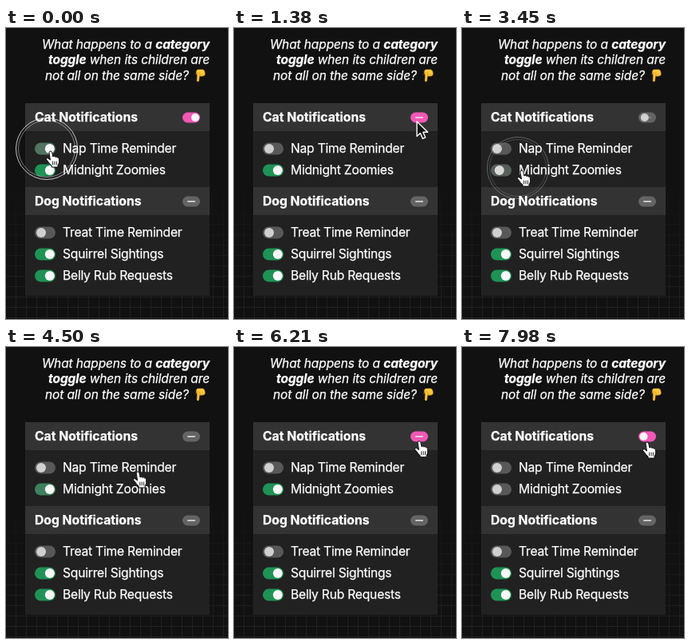
Animation of 278 by 364 pixels, one loop 8000 ms. Source, as an HTML page:

```html
<!DOCTYPE html>
<html lang="en">
<head>
<meta charset="utf-8">
<title>Category toggles</title>
<style>
  html, body { margin: 0; width: 100%; height: 100%; overflow: hidden; background: #111; }
  svg { display: block; width: 278px; height: 364px; }
  text { font: 15.6px Inter, "Open Sans", sans-serif; letter-spacing: -.2px; fill: #fff; stroke: #fff; stroke-width: .25px; }
  .head { font-size: 15.7px; font-weight: 700; letter-spacing: 0; }
  .title { font-size: 15.45px; font-style: italic; letter-spacing: -.08px; }
  .title tspan { font-weight: 700; }
</style>
</head>
<body>
<svg viewBox="0 0 278 364">
  <defs>
    <pattern id="grid" width="13" height="13" x="-1" y="-2" patternUnits="userSpaceOnUse">
      <path d="M.5 0V13M0 .5H13" stroke="#262626" fill="none"/>
    </pattern>
    <linearGradient id="fade" x2="0" y2="1">
      <stop stop-color="#fff" stop-opacity="0"/>
      <stop offset="1" stop-color="#fff" stop-opacity=".8"/>
    </linearGradient>
    <mask id="fadeMask"><rect y="185" width="278" height="179" fill="url(#fade)"/></mask>
  </defs>

  <rect width="278" height="364" fill="#111"/>
  <rect width="278" height="364" fill="url(#grid)" mask="url(#fadeMask)"/>

  <text class="title" x="255" y="26" text-anchor="end">What happens to a <tspan>category</tspan></text>
  <text class="title" x="255" y="45" text-anchor="end"><tspan>toggle</tspan> when its children are</text>
  <text class="title" x="49" y="64.5">not all on the same side?</text>

  <!-- pointing-down hand -->
  <g stroke="#d18b16" stroke-width=".5" fill="#fcc93c">
    <path d="M240 52h6.5q2.6 1 2.6 4v2.4q-.8 1.8-3 1.8h-5q-3-1.6-3-4.4 0-3 1.9-3.8z"/>
    <path d="M239.6 56h3.2l-1.2 10.2q-1.4 1.8-2.6 0z"/>
    <path d="M243.2 57v3M246 56.8v3M236.8 58.6q1.2-2 3-2.6" fill="none"/>
  </g>

  <rect x="24" y="94" width="231" height="241" fill="#212121"/>
  <path d="M24 94h231v35H24zM24 199h231v35H24z" fill="#333"/>

  <g id="rows"></g>
  <g id="controls"></g>

  <g id="ripple" stroke="#fff" fill="none">
    <circle r="38.5" stroke-width="1" stroke-opacity=".75"/>
    <circle r="35.5" stroke-width=".8" stroke-opacity=".55"/>
  </g>

  <g id="cursor" stroke-linejoin="round" stroke-linecap="round">
    <path id="arrow" d="M0 0V18.5L4.3 14.6 7.3 21.5 10.7 20 7.8 13.3H13.6Z" fill="#111" stroke="#fff" stroke-width="1.4"/>
    <g id="hand" stroke="#111" stroke-width="1">
      <path d="M-2 1.6Q-1.6-.4 0 0 1.4.3 1.8 2L2.8 7Q4.6 5.6 5.6 7.3 7.3 6.2 8.2 8 10.2 7.4 10.4 9.8
        L10.5 13.5Q10.3 16 9 17.6V20H1V18Q-2 15.6-3.2 13.2L-5.6 10.4Q-6 8.3-3.8 8.7L-.8 10.8Z" fill="#fff"/>
      <path d="M2.6 13v4M5 13v4M7.4 13v4" fill="none" stroke-width=".9"/>
    </g>
  </g>
</svg>

<script>
const LOOP = 8000;
const GREEN = [31, 146, 86], MUTED = [82, 116, 97], GREY = [88, 88, 88];
const PINK = [240, 88, 181], PILL_GREY = [100, 100, 100];
const KNOB_OFF = [208, 208, 208], KNOB_ON = [248, 248, 248];

const $ = id => document.getElementById(id);
const clamp = v => Math.max(0, Math.min(1, v));
const lerp = (a, b, k) => a + (b - a) * k;
const mix = (a, b, k) => a.map((v, i) => lerp(v, b[i], k));
const rgb = c => `rgb(${c.map(Math.round)})`;

function add(parent, tag, attrs, content = '') {
  const el = document.createElementNS('http://www.w3.org/2000/svg', tag);
  for (const name in attrs) el.setAttribute(name, attrs[name]);
  el.textContent = content;
  return $(parent).appendChild(el);
}

// A 0/1 value that flips at the given times, each flip easing over `fade` ms.
const track = (start, fade, ...flips) => t => {
  let goal = start, value = start;
  for (const flip of flips) {
    goal = 1 - goal;
    value = lerp(value, goal, clamp((t - flip) / fade));
  }
  return value;
};

function rowToggle(label, y) {
  add('rows', 'text', { x: 71, y: y + 5.2 }, label);
  const bar = add('controls', 'rect', { x: 36, y: y - 7.5, width: 26, height: 15, rx: 7.5 });
  const knob = add('controls', 'circle', { cy: y, r: 6 });
  return (on, hover = 0) => {
    bar.setAttribute('fill', rgb(mix(GREY, mix(GREEN, MUTED, hover), on)));
    knob.setAttribute('fill', rgb(mix(KNOB_OFF, KNOB_ON, on)));
    knob.setAttribute('cx', lerp(44, 54.8, on));
  };
}

function categoryToggle(label, y) {
  add('rows', 'text', { x: 36, y: y + 5.4, class: 'head' }, label);
  const bar = add('controls', 'rect', { x: 221, y: y - 6.5, width: 22, height: 13, rx: 6.5 });
  const knob = add('controls', 'circle', { cy: y, r: 5, fill: '#f4f4f4' });
  const dash = add('controls', 'rect', { x: 227, y: y - .7, width: 10, height: 1.4, rx: .7, fill: '#e6e6e6' });
  return (first, second, pink) => {
    const mixed = Math.abs(first - second);
    bar.setAttribute('fill', rgb(mix(PILL_GREY, PINK, pink)));
    knob.setAttribute('cx', lerp(227.5, 237, (first + second) / 2));
    knob.setAttribute('opacity', 1 - mixed);
    dash.setAttribute('opacity', mixed);
  };
}

const cats = categoryToggle('Cat Notifications', 112);
const nap = rowToggle('Nap Time Reminder', 151);
const zoomies = rowToggle('Midnight Zoomies', 178);
const dogs = categoryToggle('Dog Notifications', 217);
const treat = rowToggle('Treat Time Reminder', 256);
const squirrel = rowToggle('Squirrel Sightings', 283);
const belly = rowToggle('Belly Rub Requests', 310);
dogs(0, 1, 0);
treat(0);
squirrel(1);
belly(1);

const napOn = track(1, 150, 30, 6840, 7740);
const napHover = track(1, 150, 420);
const zoomiesOn = track(1, 150, 3340, 4120, 7740);
const zoomiesHover = track(0, 180, 2880, 4430, 5190, 5400);
const pillPink = track(1, 180, 30, 1200, 2535, 5740);
const handShown = track(1, 1, 1050, 1440, 2460, 2600, 5440, 5800);

const clicks = [[-150, 30], [3240, 3340], [4020, 4120], [6630, 6840], [7500, 7740]]; // down, up

const path = [ // time, x, y
  [0, 56, 154], [390, 56, 154], [780, 130, 158], [1170, 211, 129], [1380, 229, 117],
  [1860, 231, 113], [2010, 231, 113], [2430, 226, 126], [2670, 209, 149], [2800, 184, 159],
  [3090, 75, 178], [4140, 75, 178], [4500, 165, 156], [4800, 190, 150], [5100, 190, 150],
  [5280, 188, 171], [5520, 211, 130], [5880, 229, 115], [6360, 232, 119], [LOOP, 232, 119]
];

// Hermite curve through the path, at rest wherever the pointer pauses.
function slope(i, axis) {
  const [a, b, c] = [path[i - 1], path[i], path[i + 1]];
  const same = (p, q) => p[1] === q[1] && p[2] === q[2];
  return !a || !c || same(a, b) || same(b, c) ? 0 : (c[axis] - a[axis]) / (c[0] - a[0]);
}
function pointer(t) {
  const i = path.findIndex(p => p[0] > t) - 1;
  const p = path[i], q = path[i + 1], span = q[0] - p[0], k = (t - p[0]) / span;
  const ease = k * k * (3 - 2 * k);
  return [1, 2].map(axis => lerp(p[axis], q[axis], ease)
    + span * (k * (1 - k) ** 2 * slope(i, axis) - k * k * (1 - k) * slope(i + 1, axis)));
}

function draw(t) {
  const first = napOn(t), second = zoomiesOn(t);
  nap(first, napHover(t));
  zoomies(second, zoomiesHover(t));
  cats(first, second, pillPink(t));

  const [x, y] = pointer(t), hand = handShown(t) > .5;
  $('cursor').setAttribute('transform', `translate(${x} ${y})`);
  $('hand').setAttribute('opacity', hand ? 1 : 0);
  $('arrow').setAttribute('opacity', hand ? 0 : 1);

  const [down, up] = clicks.findLast(c => c[0] <= t);
  const grow = clamp((t - down) / 90);
  $('ripple').setAttribute('opacity', grow * (1 - clamp((t - up) / 180)));
  $('ripple').setAttribute('transform', `translate(${x - 5} ${y - 3}) scale(${lerp(.6, 1, grow)})`);
}

const begin = performance.now();
function tick() {
  draw((performance.now() - begin) % LOOP);
  requestAnimationFrame(tick);
}
tick();
</script>
</body>
</html>
```
